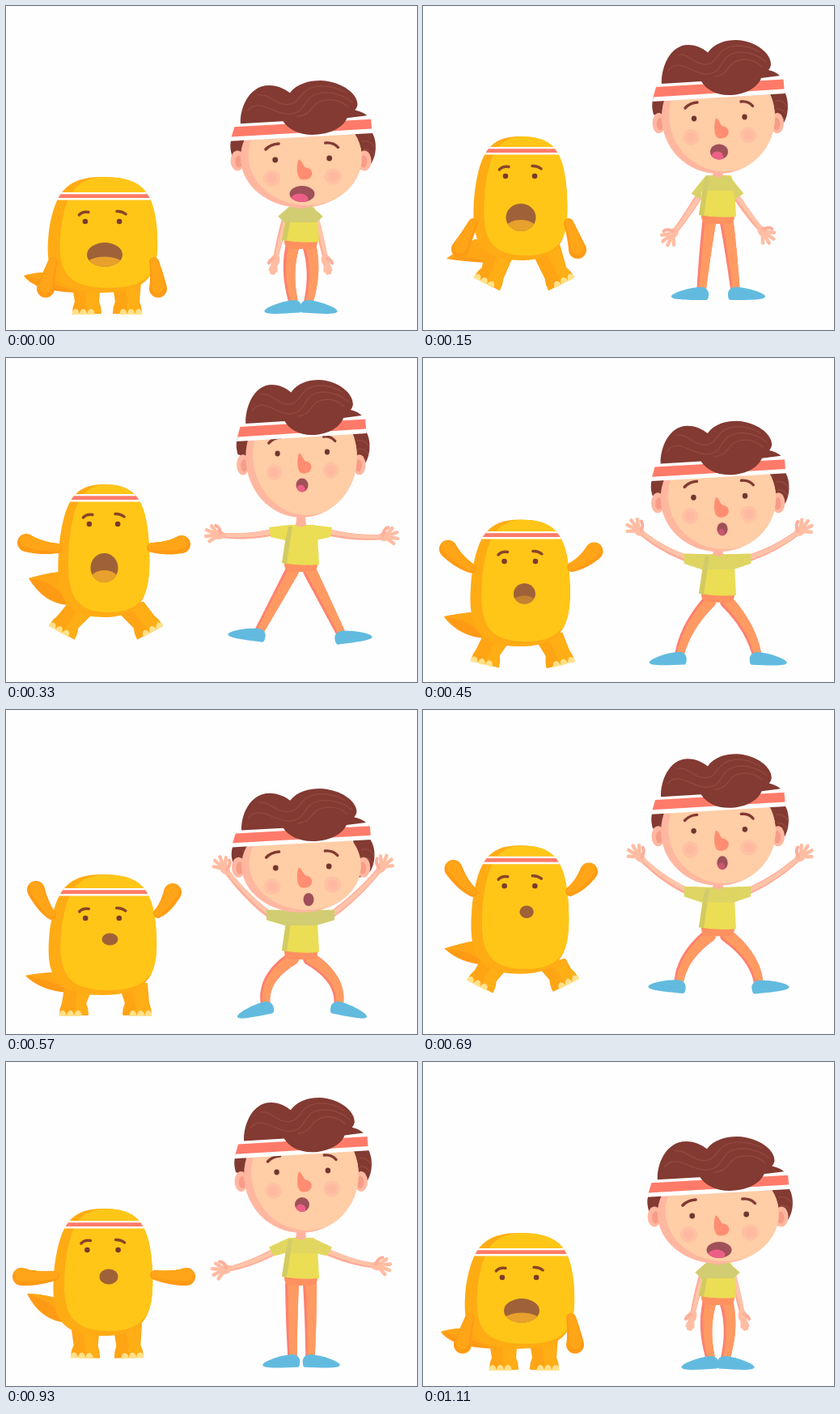
Animation, 508 px wide and 400 px high, one loop 1.14 s. Source, as an HTML page with a canvas:

```html
<!DOCTYPE html>
<html lang="en">
<head>
<meta charset="utf-8">
<title>Jumping jacks</title>
<style>
html, body { margin: 0; width: 100%; height: 100%; overflow: hidden; background: #fefefe; }
canvas { display: block; }
</style>
</head>
<body>
<canvas id="stage" width="508" height="400"></canvas>
<script>
const ctx = document.getElementById('stage').getContext('2d');
const LOOP = 1140, STEP = 30;
const KEYS = [0, 150, 330, 570, 810, 930, 1110, 1140];
const LIFT_KEYS = [0, 150, 240, 330, 360, 480, 570, 720, 810, 900, 930, 1050, 1110, 1140];

// One value per key pose; names ending in Y ride on the jump height.
const boy = {
  lift: [92, 42, 12, 27, 44, 85, 97, 42, 12, 27, 44, 81, 92, 92],
  sx: [1.071, 1, .982, 1.054, .97, 1.012],
  sy: [.985, 1, 1, .955, 1, .99],
  chin: [157, 165, 170, 153, 172, 167],
  face: [1, 0, -6, 1, -5, -5],
  mouthX: [366, 366, 366, 374, 366, 366],
  mouthY: [232, 180, 157, 234, 144, 176],
  mouthW: [15.5, 11, 7.5, 6.5, 7.5, 9],
  mouthH: [10, 9.5, 8.5, 8, 9, 9],
  tongue: [1, 1, 1, 0, 1, 1],
  neckY: [248, 209, 206, 247, 191, 217],
  hemY: [291, 260, 255, 299, 242, 267],
  shade: [1, .7, 0, 1, 0, .4],
  sleeve: [23, 27, 38, 42, 39, 36],
  sleeveY: [264, 235, 215, 253, 199, 234],
  lhX: [334, 313, 269, 274, 270, 277],
  lhY: [308, 276, 219, 201, 188, 255],
  rhX: [394, 416, 462, 460, 464, 453],
  rhY: [308, 274, 221, 199, 188, 251],
  splay: [.35, 1, 1, 1, 1, 1],
  lfX: [356, 344, 312, 321, 311, 354],
  lfY: [368, 352, 339, 365, 320, 366],
  rfX: [373, 386, 415, 411, 419, 376],
  rfY: [368, 352, 342, 365, 321, 366],
  bow: [9, 1, 0, 22, 7, 1],
  tilt: [.06, 0, -.12, .2, -.4, .04]
};
const dino = {
  lift: [211, 161, 140, 156, 181, 200, 203, 158, 140, 156, 181, 205, 211, 211],
  l: [50, 61, 63, 51, 65, 57],
  r: [188, 179, 178, 187, 175, 182],
  botY: [354, 314, 320, 352, 308, 338],
  band: [19, 13, 12, 17, 10, 15],
  eye: [55, 49, 49, 54, 46, 51],
  mouthX: [122, 121, 121.5, 128.5, 127.5, 127],
  mouthY: [307, 261, 259, 283, 224, 265],
  mouthW: [22, 18.5, 17, 10, 8.5, 11.5],
  mouthH: [15, 17, 18, 7.5, 8.5, 9.5],
  tongue: [1, 1, 1, 0, 0, 0],
  lsX: [58, 62, 64, 56, 67, 60],
  lsY: [316, 268, 235, 253, 211, 264],
  lhX: [49, 46, 25, 37, 33, 19],
  lhY: [349, 300, 228, 222, 192, 265],
  rsX: [183, 180, 180, 188, 176, 184],
  rsY: [316, 268, 234, 251, 211, 263],
  rhX: [188, 191, 217, 206, 209, 223],
  rhY: [349, 301, 230, 225, 195, 265],
  tailX: [22, 29, 28, 24, 29, 26],
  tailY: [333, 312, 272, 328, 268, 286],
  rootX: [46, 64, 66, 62, 68, 60],
  rootY: [329, 288, 264, 324, 253, 291],
  baseX: [88, 78, 76, 78, 78, 76],
  baseY: [354, 317, 305, 349, 289, 322],
  hips: [25, 28, 29, 33, 36, 26],
  lfX: [100, 79, 69, 84, 57, 98],
  lfY: [380, 343, 339, 377, 314, 365],
  rfX: [150, 171, 178, 162, 191, 152],
  rfY: [380, 343, 339, 377, 312, 365],
  turn: [0, .49, .51, 0, .96, .04]
};

function spline(ts, vs, t) {
  const last = ts.length - 1;
  let i = 0;
  while (i < last - 1 && t >= ts[i + 1]) i++;
  const rise = k => (vs[k + 1] - vs[k]) / (ts[k + 1] - ts[k]);
  const slope = k => {
    if (k === 0 || k === last) return 0;
    const a = rise(k - 1), b = rise(k);
    if (a * b <= 0) return 0;
    const h0 = ts[k] - ts[k - 1], h1 = ts[k + 1] - ts[k];
    return (a * h1 + b * h0) / (h0 + h1);
  };
  const h = ts[i + 1] - ts[i], u = (t - ts[i]) / h, v = 1 - u;
  return v * v * ((1 + 2 * u) * vs[i] + u * h * slope(i)) +
         u * u * ((3 - 2 * u) * vs[i + 1] - v * h * slope(i + 1));
}

function poseAt(def, t) {
  const liftAt = x => spline(LIFT_KEYS, def.lift, x);
  const p = { top: liftAt(t) };
  for (const name in def) {
    if (name === 'lift') continue;
    const rides = name.endsWith('Y');
    let vs = [...def[name], def[name][0], def[name][0]];
    if (rides) vs = vs.map((v, i) => v - liftAt(KEYS[i]));
    p[name] = spline(KEYS, vs, t) + (rides ? p.top : 0);
  }
  return p;
}

function shape(d, color) {
  ctx.fillStyle = color;
  ctx.fill(typeof d === 'string' ? new Path2D(d) : d);
}
function line(d, color, width) {
  ctx.strokeStyle = color;
  ctx.lineWidth = width;
  ctx.stroke(new Path2D(d));
}
function oval(x, y, rx, ry, color) {
  const p = new Path2D();
  p.ellipse(x, y, Math.max(rx, .1), Math.max(ry, .1), 0, 0, 7);
  shape(p, color);
  return p;
}
function local(draw, x, y, angle = 0, sx = 1, sy = 1) {
  ctx.save();
  ctx.translate(x, y);
  ctx.rotate(angle);
  ctx.scale(sx, sy);
  draw();
  ctx.restore();
}
// Tapered, rounded limb along a quadratic curve.
function limb(x0, y0, cx, cy, x1, y1, w0, w1, color) {
  const p = new Path2D(), n = 60;
  for (let i = 0; i <= n; i++) {
    const u = i / n, v = 1 - u;
    const x = v * v * x0 + 2 * u * v * cx + u * u * x1;
    const y = v * v * y0 + 2 * u * v * cy + u * u * y1;
    const r = (w0 * v + w1 * u) / 2;
    p.moveTo(x + r, y);
    p.arc(x, y, r, 0, Math.PI * 2);
  }
  shape(p, color);
}
function mouth(p, inside, tongue, dx, dy, size) {
  const hole = oval(p.mouthX, p.mouthY, p.mouthW, p.mouthH, inside);
  ctx.save();
  ctx.clip(hole);
  ctx.globalAlpha = p.tongue;
  oval(p.mouthX + dx * p.mouthW, p.mouthY + dy * p.mouthH, p.mouthW * size, p.mouthH * .68, tongue);
  ctx.restore();
}

const HAIR = '#823a32', SKIN = '#ffcda6', BLUSH = '#ffb7a0', RED = '#ff7b69';

function hand(x, y, angle, side, splay) {
  local(() => {
    ctx.lineCap = 'round';
    oval(6, 0, 8, 5.5, '#ffbda3');
    for (const [a, len] of [[-.5, 19], [-.15, 22], [.2, 22], [.55, 19]])
      line(`M6,0L${len * Math.cos(a * splay)},${len * Math.sin(a * splay)}`, '#ffbda3', 4.4);
    line(`M4,2Q6,${4 + 6 * splay} 11,${5 + 6 * splay}`, '#ffae99', 4);
  }, x, y, angle, 1, -side);
}

function boyArm(p, side, x, y) {
  const sx = 364 + side * (p.sleeve - 4), sy = p.sleeveY;
  const cx = (sx + x) / 2 + side * 2, cy = (sy + y) / 2 + 5;
  limb(sx, sy, cx, cy, x, y, 8.5, 6.5, '#ffab97');
  limb(sx + 1, sy - 1, cx + 1, cy - 1, x + .5, y - .5, 5.5, 4.5, '#ffc4a9');
  hand(x, y, Math.atan2(y - cy, x - cx), side, p.splay);
}

function boyLeg(p, side, x, y) {
  const hx = 364.5 + side * 11, hy = p.hemY + 8;
  const cx = (hx + x) / 2 + side * p.bow, cy = (hy + y) / 2 - p.bow * .2;
  limb(hx, hy, cx, cy, x, y, 17, 11.5, '#ff806f');
  limb(hx + 1.8, hy, cx + 1.8, cy, x + 1.2, y, 13.5, 9, '#ff9b62');
  local(() => shape('M-9,5C-10,-1-5,-5 0,-5C12,-5 34,1 37,6C38,11 20,11 -6,11C-8,11-9,8-9,5Z', '#62bbdf'),
    x, y, side * p.tilt, side, 1);
}

function sleeve(p, side) {
  const x = 364 + side * p.sleeve, y = p.sleeveY, t = p.neckY;
  const dx = x - (364 + side * 13), dy = y - t - 5, len = Math.hypot(dx, dy);
  const nx = side * dy / len * 6.2, ny = -side * dx / len * 6.2;
  return new Path2D(`M364,${t}L${364 + side * 14},${t}L${x + nx},${y + ny}L${x - nx},${y - ny}L${364 + side * 19},${t + 19}L364,${t + 19}Z`);
}

function shirt(p) {
  const t = p.neckY, b = p.hemY;
  const yellow = '#ebdd54', olive = '#d2cd72';
  const sleeves = color => [-1, 1].forEach(side => shape(sleeve(p, side), color));
  const body = new Path2D(`M349,${t + 1}Q365,${t + 4} 381,${t}L385,${t + 14}L387,${b}Q364,${b + 2} 341,${b - 2}L346,${t + 14}Z`);
  sleeves(yellow);
  shape(body, yellow);
  shape(`M349,${t + 2}L354,${t + 2}L347,${b - 1}L341,${b - 2}L346,${t + 16}Z`, '#d3ca62');
  ctx.save();
  ctx.globalAlpha = p.shade;
  sleeves(olive);
  ctx.restore();
}

function boyHead(p) {
  const ry = p.chin - 95, ear = 141 + (p.chin - 157) * .45;
  local(() => {
    ctx.translate(-367, -42);
    shape('M425,96L443,101C453,111 453,132 446,144Q440,151 430,152Z', HAIR);
    shape('M286,110C282,119 283,127 285,134L303,140L303,110Z', HAIR);
    line('M436,117Q444,115 450,124M437,127Q444,126 449,134', '#944a40', 1.3);
    for (const [x, c] of [[291.5, 293], [438, 437]]) {
      oval(x, ear, 8, 12.5, BLUSH);
      oval(c, ear + 1, 4.2, 7.5, '#f79c88');
    }
    const face = oval(365, 137, 70, ry, BLUSH);
    ctx.save();
    ctx.clip(face);
    oval(372, 134, 68, ry, SKIN);
    ctx.restore();

    ctx.save();
    ctx.translate(0, p.face);
    for (const [x, y] of [[331, 162], [402, 159.5]]) {
      oval(x, y, 10, 10, '#ffc1a3');
      oval(x, y, 6, 6, '#ffb9a0');
    }
    oval(335, 139, 3.2, 3.4, '#74352f');
    oval(397.5, 137, 3.2, 3.4, '#74352f');
    ctx.lineCap = 'round';
    line('M324,126Q330,119.500 339,119M393,118Q402,117 407.500,123.500', HAIR, 3.4);
    shape('M362,138.500C359,147 360,158 363,161.500C366,164.500 372,164 375.500,161C380,156 377,149 370.500,148.500C367,147 366,139 362,138.500Z', '#ff8d71');
    ctx.restore();
  }, 367, p.top, 0, p.sx, 1);

  local(() => {
    ctx.translate(-367, -42);
    shape('M290,94L445,85.500L447,108L283.500,118Z', '#fff');
    shape('M288,100L445.500,90.500L446.500,102.500L284.500,112.500Z', RED);
    shape('M295,96C294,78 304,48 328,48C338,48 347,53 352,57.500C360,46 374,42 387,42C412,43 431,59 430,73Q429,77 427,79Q436,81 441,86L418,89C413,102 396,110 378,110C362,110 350,103 344,93Z', HAIR);
    ctx.lineCap = 'round';
    line('M303,80C316,62 333,85 352,84C374,82 365,57 394,57Q412,58 424,69M315,60C329,58 335,73 350,72C366,71 362,50 388,49Q404,49 416,57M361,87C382,84 373,68 397,66Q410,66 419,75', '#93483f', 1.3);
  }, 367, p.top, 0, p.sx, p.sy);
  mouth(p, '#9f5058', '#ed5f86', -.2, .62, .68);
}

function drawBoy(p) {
  p.lfY = Math.min(p.lfY, 368);
  p.rfY = Math.min(p.rfY, 368);
  boyLeg(p, -1, p.lfX, p.lfY);
  boyLeg(p, 1, p.rfX, p.rfY);
  const h = p.hemY;
  shape(`M344,${h - 4}L385,${h - 4}Q386,${h + 9} 377,${h + 9}L353,${h + 9}Q343,${h + 9} 344,${h - 4}Z`, '#ff9160');
  boyArm(p, -1, p.lhX, p.lhY);
  boyArm(p, 1, p.rhX, p.rhY);
  shirt(p);
  const chin = p.top + p.chin;
  shape(`M360,${chin - 6}L369,${chin - 6}L371,${p.neckY}Q365,${p.neckY + 5} 358,${p.neckY}Z`, '#ffb39d');
  boyHead(p);
}

function bodyPath(l, r, t, b) {
  const c = (l + r) / 2, w = r - l, h = b - t;
  const x = k => c + k * w, y = k => t + k * h;
  return new Path2D(`M${c},${t}C${x(.33)},${t} ${x(.45)},${y(.1)} ${x(.486)},${y(.42)}` +
    `C${x(.52)},${y(.8)} ${x(.46)},${b} ${c},${b}` +
    `C${x(-.46)},${b} ${x(-.52)},${y(.82)} ${x(-.476)},${y(.45)}` +
    `C${x(-.42)},${y(.12)} ${x(-.31)},${t} ${c},${t}Z`);
}

function dinoLeg(p, side, x, y) {
  const a = -side * p.turn, hx = 124 + side * p.hips, hy = p.botY - 14;
  const dx = Math.cos(a), dy = Math.sin(a);
  const at = (k, up) => `${x + dx * k + dy * up},${y + dy * k - dx * up}`;
  const hip = k => `${hx + Math.cos(a / 2) * k},${hy + Math.sin(a / 2) * k}`;
  const leg = `M${at(-17, 1)}L${at(17, 1)}Q${at(17, 8)} ${at(14, 15)}L${hip(17)}L${hip(-17)}L${at(-14, 15)}Q${at(-17, 8)} ${at(-17, 1)}Z`;
  ctx.lineJoin = 'round';
  line(leg, '#ffa414', 2);
  shape(leg, '#ffa414');
  shape(`M${at(0, 1)}L${at(17, 1)}Q${at(17, 8)} ${at(14, 15)}L${hip(17)}L${hip(-2)}Z`, '#ffae16');
  local(() => {
    for (const k of [14, 4.5, -5]) {
      const toe = new Path2D();
      toe.ellipse(side * k, 1, 4.6, 7, 0, Math.PI, Math.PI * 2);
      shape(toe, '#ffe18a');
    }
  }, x, y, a);
}

function dinoArm(side, x0, y0, x1, y1) {
  const cx = (x0 + x1) / 2 + side * 2, cy = (y0 + y1) / 2 + 4;
  limb(x0, y0, cx, cy, x1, y1, 12, 22, '#ff9a14');
  limb(x0, y0 - 1, cx, cy - 3, x1, y1 - 2.5, 9, 16, '#ffa517');
}

function drawDino(p) {
  const { l, r, top, botY } = p, w = r - l, c = (l + r) / 2;
  p.lfY = Math.min(p.lfY, 380);
  p.rfY = Math.min(p.rfY, 380);
  const mx = (p.tailX + p.rootX) / 2, my = (p.tailY + p.rootY) / 2;
  const tail = `M${p.tailX},${p.tailY}Q${mx + 2},${my - 2} ${p.rootX},${p.rootY}L${p.baseX + 8},${p.rootY}L${p.baseX},${p.baseY}`;
  shape(`${tail}Q${mx},${p.baseY - 2} ${p.tailX},${p.tailY}Z`, '#ff9a14');
  shape(`${tail}Q${mx + 18},${my + 8} ${p.tailX},${p.tailY}Z`, '#ffa616');
  dinoLeg(p, -1, p.lfX, p.lfY);
  dinoLeg(p, 1, p.rfX, p.rfY);

  const body = bodyPath(l, r, top, botY);
  shape(body, '#ffab14');
  ctx.save();
  ctx.clip(body);
  shape(bodyPath(l + w * .11, r + 1, top, botY - 6), '#ffc618');
  const y = top + p.band;
  shape(`M0,${y}H260V${y + 9.5}H0Z`, '#fff');
  shape(`M0,${y + 2.3}H260V${y + 7}H0Z`, RED);
  ctx.restore();

  const e = top + p.eye, gap = w * .153;
  oval(c - gap, e, 3.3, 3.3, '#7b3b2b');
  oval(c + gap, e, 3.3, 3.3, '#7b3b2b');
  ctx.lineCap = 'round';
  line(`M${c - gap - 7.5},${e - 8}q4,-4.500 11.500,-3.500M${c + gap - 3},${e - 12.5}q6,-.5 11,3.500`, '#8a4528', 3.5);
  mouth(p, '#9f6238', '#e8a12c', 0, .85, 1.05);
  dinoArm(-1, p.lsX, p.lsY, p.lhX, p.lhY);
  dinoArm(1, p.rsX, p.rsY, p.rhX, p.rhY);
}

function frame(now) {
  const t = Math.floor((now % LOOP) / STEP) * STEP;
  ctx.fillStyle = '#fefefe';
  ctx.fillRect(0, 0, 508, 400);
  drawDino(poseAt(dino, t));
  drawBoy(poseAt(boy, t));
  requestAnimationFrame(frame);
}
requestAnimationFrame(frame);
</script>
</body>
</html>
```
